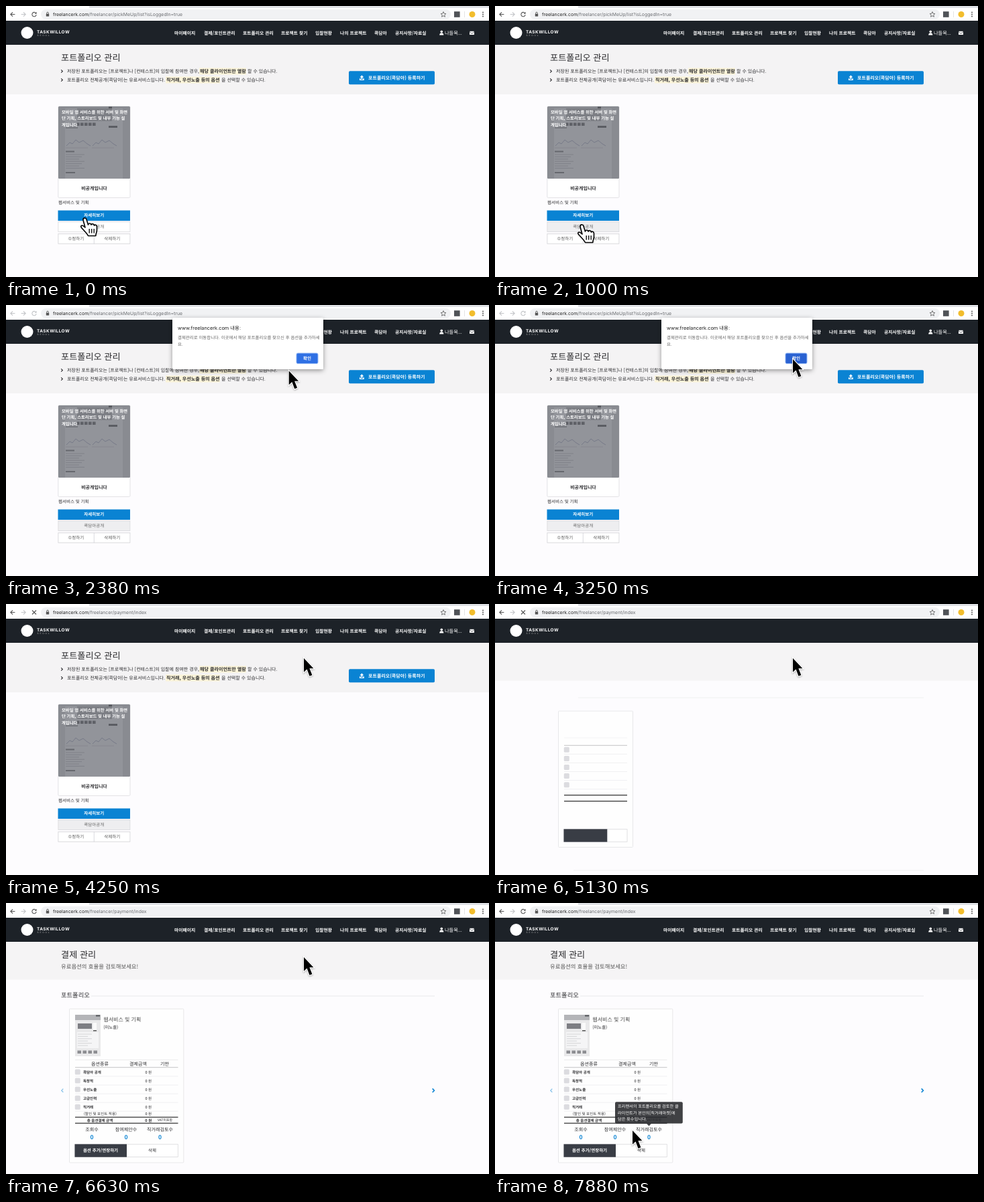
An HTML page for the animation above (8 s loop, 720 by 405 pixels).

```html
<!DOCTYPE html>
<html lang="ko">
<head>
<meta charset="utf-8">
<title>포트폴리오 관리</title>
<style>
  html, body { margin: 0; height: 100%; overflow: hidden; background: #fdfcfe; }
  svg { display: block; width: 100vw; height: 100vh; }
  text { font-family: 'Noto Sans CJK KR', 'Noto Sans CJK', sans-serif; text-rendering: geometricPrecision; white-space: pre; }
  .ui { font-family: Inter, 'Noto Sans CJK KR', sans-serif; }
</style>
</head>
<body>
<svg id="stage" viewBox="0 0 720 405"></svg>
<script>
const LOOP = 8000;
const DARK = '#2b2b2e', BLUE = '#0a83d3', RULE = '#e3e2e5';

// cy is the vertical middle of the glyphs
const text = (x, cy, size, str, { fill = DARK, w = 400, mid, ui, ls = 0 } = {}) =>
  `<text x="${x}" y="${cy + size * 0.37}" font-size="${size}" font-weight="${w}" fill="${fill}"` +
  `${mid ? ' text-anchor="middle"' : ''}${ui ? ' class="ui"' : ''}${ls ? ` letter-spacing="${ls}"` : ''}>${str}</text>`;
const rect = (x1, y1, x2, y2, fill, rx = 0, stroke = 'none') =>
  `<rect x="${x1}" y="${y1}" width="${x2 - x1}" height="${y2 - y1}" rx="${rx}" fill="${fill}" stroke="${stroke}" stroke-width=".8"/>`;
const line = (d, stroke, w = 1, extra = '') =>
  `<path d="${d}" fill="none" stroke="${stroke}" stroke-width="${w}" ${extra}/>`;
const rule = (x1, x2, y, color = RULE, w = 0.8) => line(`M${x1} ${y}H${x2}`, color, w);
const shape = (d, fill) => `<path d="${d}" fill="${fill}"/>`;
const group = (id, ...parts) => `<g id="${id}">${parts.join('')}</g>`;
const repeat = (n, f) => Array.from({ length: n }, (_, i) => f(i)).join('');
const bold = { w: 700 }, white = { w: 700, fill: '#fff' };
const centered = (o = {}) => ({ mid: true, ...o });

const browser = () => [
  rect(0, 0, 720, 22, '#fff'),
  rect(124, 0, 720, 3, '#dfe1e5'),
  rect(52, 5, 663, 20, '#f1f2f4', 7.5),
  rect(59.8, 11.8, 64.2, 15.6, '#555', 0.6),
  line('M60.7 12V10.5a1.3 1.3 0 0 1 2.6 0V12', '#555', 0.9),
  shape('M652 8.6l1.1 2.6 2.8.3-2.1 1.9.6 2.8-2.4-1.5-2.4 1.5.6-2.8-2.1-1.9 2.8-.3z" stroke="#555" stroke-width=".8', '#f1f2f4'),
  rect(668, 8.2, 676.6, 16.8, '#505357'),
  line('M683.5 8V17', '#ddd', 0.8),
  '<circle cx="695" cy="12.5" r="4.5" fill="#f2bd2c"/>',
  repeat(3, i => `<circle cx="711" cy="${9.5 + i * 3}" r=".95" fill="#555"/>`),
  group('back', line('M13.4 12.5H7M10 9.3L6.8 12.5 10 15.7', 'currentColor', 1.1)),
  line('M22.6 12.5H29M26 9.3L29.2 12.5 26 15.7', '#c3c5c8', 1.1),
  group('reload', line('M44.6 10.6A3.2 3.2 0 1 0 45.2 13.2', 'currentColor', 1.1), shape('M45.6 8.8v3h-3z', 'currentColor')),
  group('stop', line('M39 9.5L45 15.5M45 9.5L39 15.5', '#555', 1.1)),
  text(70, 12.5, 6.9, 'freelancerk.com<tspan fill="#6a6c70" id="path"></tspan>', { ui: true, fill: '#222' }),
].join('');

const header = () => rect(0, 22, 720, 58, '#1d2228') +
  '<circle cx="31.5" cy="40" r="9" fill="#fff"/>' +
  text(46, 38.2, 6.4, 'TASKWILLOW', { ui: true, w: 700, fill: '#fff', ls: 0.5 }) +
  text(46.5, 43.8, 3.2, 'SEOUL', { ui: true, fill: '#bbb', ls: 1.9 });

const menu = () => [[251, '마이페이지'], [295, '결제/포인트관리'], [353, '포트폴리오 관리'], [410, '프로젝트 찾기'],
  [461, '입찰현황'], [498, '나의 프로젝트'], [549, '콕담아'], [580, '공지사항/자료실']]
  .map(([x, s]) => text(x, 40.5, 6.8, s, white)).join('') +
  '<circle cx="649.3" cy="38.3" r="1.8" fill="#fff"/>' + shape('M646.2 43.6q0-3.4 3.1-3.4t3.1 3.4z', '#fff') +
  text(654, 40.3, 7.2, '나들목...', { fill: '#fff', w: 500 }) +
  rect(691, 37.8, 698, 43, '#fff', 0.6) + line('M691 38.6L694.5 41.2 698 38.6', '#1d2228', 0.7);

const listCard = () => [
  rect(77.8, 150, 185, 286.5, '#fff', 1.5, '#dcdce0'),
  rect(78, 150, 185, 258, '#898b91', 1.5),
  rect(88, 153, 174, 258, '#92949a'),
  rect(106, 153, 158, 172, '#7c7e84'),
  rect(153, 150.5, 158, 153, '#55575c'),
  repeat(5, i => rect(105 + i * 6, 174.5, 109.6 + i * 6, 179, '#5f6167')),
  rect(153, 179, 166, 182, '#5b5d63'),
  rect(89, 181, 107, 183, '#74767c'),
  repeat(2, i => line(`M${90 + i * 39} 209l5-5 4 2 5-6 5 4 6-3 6 5 5 3`, '#6b6f80', 0.7) + rule(89 + i * 39, 122 + i * 39, 212, '#7d7f86', 0.6)),
  rect(89, 216.5, 102, 218.5, '#66686e'),
  repeat(7, i => rule(89, 117 - (i % 3) * 4, 222 + i * 3.4, '#7b7d84', 0.8)),
  rect(89, 248, 103, 250, '#66686e'),
  ['모바일 앱 서비스를 위한 서버 및 화면', '단 기획, 스토리보드 및 내부 기능 설', '계입니다']
    .map((s, i) => text(83, 158.8 + i * 9.2, 6.35, s, white)).join(''),
  text(131.5, 272, 7, '비공개입니다', centered(bold)),
  text(78, 294, 6.5, '웹서비스 및 기획'),
  rect(77.5, 305.5, 185, 321, BLUE),
  text(131.3, 312.8, 6.5, '자세히보기', centered(white)),
  `<rect id="publish" x="77.9" y="322.4" width="107" height="15" stroke="#d9d9dc" stroke-width=".8"/>`,
  text(131.3, 329.8, 6.5, '콕담아공개', centered({ fill: '#666' })),
  rect(77.9, 340.4, 184.9, 355.2, '#fff', 0, '#d2d2d6'),
  line('M131.3 340V355.5', '#d2d2d6', 0.8),
  text(104.3, 347.5, 6.5, '수정하기', centered({ fill: '#555' })),
  text(158.3, 347.5, 6.5, '삭제하기', centered({ fill: '#555' })),
].join('');

const listPage = () => [
  rect(0, 58, 720, 132, '#f4f3f4'),
  text(82, 77, 13.2, '포트폴리오 관리', { w: 500 }),
  rect(288, 92.5, 358, 102.5, '#fbf4d9'),
  rect(238, 105.5, 319, 115.5, '#fbf4d9'),
  repeat(2, i => line(`M82.2 ${95.3 + i * 13}l2.2 2.2-2.2 2.2`, DARK, 1.1)),
  text(91, 97.5, 7, '저장된 포트폴리오는 [프로젝트]나 [컨테스트]의 입찰에 참여한 경우,'),
  text(289, 97.5, 7.05, '해당 클라이언트만 열람', bold),
  text(360, 97.5, 7, '할 수 있습니다.'),
  text(91, 110.5, 7, '포트폴리오 전체공개(콕담아)는 유료서비스입니다.'),
  text(239, 110.5, 7.05, '직거래, 우선노출 등의 옵션', bold),
  text(321, 110.5, 7, '을 선택할 수 있습니다.'),
  rect(511, 97.3, 639, 117.3, BLUE, 1.8),
  shape('M530.4 103.5l3 3.1h-2v2.6h-2v-2.6h-2zM527 108.3h1.6v1.7h3.6v-1.7h1.6v2.7h-6.8z', '#fff'),
  text(540, 107.2, 7, '포트폴리오(콕담아) 등록하기', white),
  listCard(),
].join('');

const checkbox = cy => rect(102.8, cy - 4, 110.8, cy + 4, '#dcdce0', 1.5);
const payBanner = rect(0, 58, 720, 114.5, '#f5f4f5');

const skeleton = () => [
  payBanner,
  rule(124, 639, 140, '#ecebed'),
  rule(117, 639, 398, '#ecebed'),
  rect(94.5, 160, 205.5, 363.5, '#fefefe', 1, RULE),
  rule(103, 197, 200, '#f0f0f1'),
  rule(103, 197, 211.3, '#b5b5b8'),
  repeat(5, i => checkbox(217.8 + i * 13.1) + rule(103, 197, 224.3 + i * 13.1, '#ededef')),
  rule(103, 197, 285.7, '#333', 1.2),
  rule(103, 197, 294.7, '#333', 1.2),
  rect(102.8, 336.7, 197, 355.3, '#fff', 0, '#d9d9dc'),
  rect(102.5, 336.4, 167.3, 355.6, '#393d45'),
].join('');

const payThumb = () => [
  rect(103, 167, 141, 229, '#e9e9ea'),
  rect(103, 167, 141, 175, '#b4b5b8'),
  rect(134, 167.5, 140, 169.5, '#55575b'),
  rect(107, 180, 128, 188, '#7d7e83'),
  rect(129.5, 179, 135, 191, '#fafafa'),
  rect(130, 190, 135, 191.5, '#555'),
  rect(106, 193, 138, 217, '#f5f5f6'),
  repeat(6, i => rule(107, 128 - (i % 2) * 6, 196 + i * 3.4, '#c6c7ca', 0.7)),
  repeat(4, i => rect(106.5 + i * 8, 220.5, 112 + i * 8, 225, '#8d8e92')),
].join('');

const payPage = () => [
  payBanner,
  text(82, 77, 13.2, '결제 관리', { w: 500 }),
  text(82, 95, 8.4, '유료옵션의 효율을 검토해보세요!', { fill: '#555' }),
  text(82, 138, 9.3, '포트폴리오', { w: 500 }),
  rule(127, 639, 139, RULE),
  line('M85.3 277.6l-2.5 2.6 2.5 2.6', '#7dbde8', 1.2),
  line('M635.7 277.4l2.7 2.8-2.7 2.8', BLUE, 1.6),
  rect(94.5, 158.2, 264.8, 388, '#fefefe', 1, RULE),
  payThumb(),
  text(145.3, 174, 8, '웹서비스 및 기획', { fill: '#444' }),
  text(145.3, 185.3, 6.4, '(미노출)'),
  rule(103, 256.5, 234.5, '#e6e6e8'),
  [[140, '옵션종류'], [197, '결제금액'], [236.5, '기한']].map(([x, s]) => text(x, 240.2, 7, s, centered({ w: 500 }))).join(''),
  rule(103, 256.5, 245.7, '#b5b5b8'),
  ['콕담아 공개', '독창적', '우선노출', '고급인력', '직거래'].map((s, i) => {
    const y = 252.5 + i * 13.05;
    return checkbox(y) + text(115, y, 5.5, s, bold) + text(212.3, y, 5.5, '0 원', centered()) + rule(103, 256.5, y + 6.5, '#e9e9eb', 0.7);
  }).join(''),
  text(116, 315.2, 5.5, '(할인 및 포인트 적용)'),
  text(212.3, 315.2, 5.5, '0 원', centered()),
  rule(103, 256.5, 320.2, '#333', 1.2),
  text(140, 324.6, 5.5, '총 옵션결제 금액', centered(bold)),
  text(212.3, 324.6, 5.5, '0 원', centered(bold)),
  text(237, 324.6, 4.9, 'VAT미포함', centered()),
  rule(103, 256.5, 329.2, '#333', 1.2),
  [[128, '조회수'], [179, '참여제안수'], [229.5, '직거래검토수']].map(([x, s]) =>
    text(x, 338.7, 7.05, s, centered({ w: 500 })) + text(x, 350.3, 8.5, '0', centered({ w: 700, fill: BLUE }))).join(''),
  rect(102.8, 360.7, 256.3, 379.4, '#fff', 0, '#d9d9dc'),
  rect(102.5, 360.4, 180, 379.7, '#393d45'),
  text(141, 369.7, 6.5, '옵션 추가/연장하기', centered(white)),
  text(218, 369.7, 6.5, '삭제', centered()),
].join('');

const dialog = () => [
  '<rect x="248" y="19" width="225" height="77" rx="2.5" fill="#fff" filter="url(#soft)"/>',
  rect(248, 21, 473, 96, '#fff', 2.5),
  text(256, 34, 7.35, 'www.freelancerk.com 내용:', { ui: true, fill: '#222' }),
  text(256, 49, 6.44, '결제관리로 이동합니다. 이곳에서 해당 포트폴리오를 찾으신 후 옵션을 추가하세', { fill: '#666' }),
  text(256, 59, 6.44, '요.', { fill: '#666' }),
  '<rect id="ok" x="433" y="72" width="32" height="15.6" rx="2" stroke="#8fb4f3" stroke-width="1"/>',
  text(449, 79.8, 6.5, '확인', centered(white)),
].join('');

const tooltip = () =>
  '<g opacity=".88">' + rect(179, 297.3, 279.8, 329.5, '#26272b', 2) + shape('M225.8 329.5h7.4l-3.7 3.8z', '#26272b') + '</g>' +
  ['프리랜서의 포트폴리오를 검토한 클', '라이언트가 본인의[직거래마켓]에', '담은 횟수입니다.']
    .map((s, i) => text(183, 303.6 + i * 9.8, 6.2, s, { fill: '#fff' })).join('');

const arrow = '<path d="M0 0V20.8L4.6 16.6 8.5 26.8 12.4 25.2 8.4 15.3H14.4Z" fill="#000" stroke="#fff" stroke-width="2" paint-order="stroke" filter="url(#drop)"/>';
const hand = '<path d="M-3 2C-3.5-1.5 1-2.5 2 1L4.5 9C4.5 6.5 8.5 6 9 9C9.5 7 13 7 13.5 10C14.5 8.5 17.5 9 17.5 12V17C17.5 20 16 21 15.8 25.5H4.5C3 22-1 18.5-4 15C-8 11.5-6 9-3 10.5L0 13Z" fill="#fff" stroke="#000" stroke-width="1.6" stroke-linejoin="round"/>' +
  line('M6.2 15V21.5M9.7 15V21.5M13.2 15V21.5', '#000', 1.3);

stage.innerHTML =
  '<defs><filter id="soft" x="-10%" y="-20%" width="120%" height="150%"><feDropShadow dx="0" dy="2" stdDeviation="3.5" flood-opacity=".4"/></filter>' +
  '<filter id="drop" x="-50%" y="-30%" width="200%" height="170%"><feDropShadow dx="0" dy="1" stdDeviation="1" flood-opacity=".35"/></filter></defs>' +
  rect(0, 0, 720, 405, '#fdfcfe') +
  group('list', listPage()) + group('bones', skeleton()) + group('pay', payPage()) +
  header() + group('menu', menu()) + browser() +
  group('dialog', dialog()) + group('tip', tooltip()) + group('hand', hand) + group('arrow', arrow);

const $ = id => document.getElementById(id);
const show = (id, on) => $(id).style.display = on ? '' : 'none';

// Moments of the story, in ms
const OPEN = 1200, CLOSE = 3740, NAVIGATE = 4990, LOADED = 5870, TIP = 7860;

const smooth = p => p * p * (3 - 2 * p);
const easeOut = p => 1 - (1 - p) ** 2;
const MOVES = [
  { start: 120, end: 880, to: [130, 328], ease: smooth },
  { start: 1640, end: 2650, to: [444, 81], ease: easeOut },
  { start: 6940, end: 7740, to: [205, 340], ease: smooth },
];

function cursorAt(t) {
  let pos = [118, 318];
  for (const { start, end, to, ease } of MOVES) {
    const p = ease(Math.min(1, Math.max(0, (t - start) / (end - start))));
    pos = pos.map((v, i) => v + (to[i] - v) * p);
  }
  return pos;
}

function draw(t) {
  const [x, y] = cursorAt(t);
  const modal = t >= OPEN && t < CLOSE;
  const loading = t >= CLOSE && t < LOADED;

  show('list', t < NAVIGATE);
  show('bones', t >= NAVIGATE && t < LOADED);
  show('pay', t >= LOADED);
  show('menu', t < NAVIGATE || t >= LOADED);
  show('dialog', modal);
  show('tip', t >= TIP);
  show('reload', !loading);
  show('stop', loading);
  show('hand', t < OPEN);
  show('arrow', t >= OPEN);

  for (const id of ['back', 'reload']) $(id).style.color = modal ? '#c3c5c8' : '#555';
  $('path').textContent = t < CLOSE ? '/freelancer/pickMeUp/list?isLoggedIn=true' : '/freelancer/payment/index';
  $('publish').setAttribute('fill', t >= OPEN || y > 322 ? '#eeeef0' : '#fff');
  $('ok').setAttribute('fill', x > 433 && y < 88 ? '#2a62d2' : '#2f70e4');
  $(t < OPEN ? 'hand' : 'arrow').setAttribute('transform', `translate(${x} ${y})`);
}

const begin = performance.now();
(function tick() {
  draw((performance.now() - begin) % LOOP);
  requestAnimationFrame(tick);
})();
</script>
</body>
</html>
```
